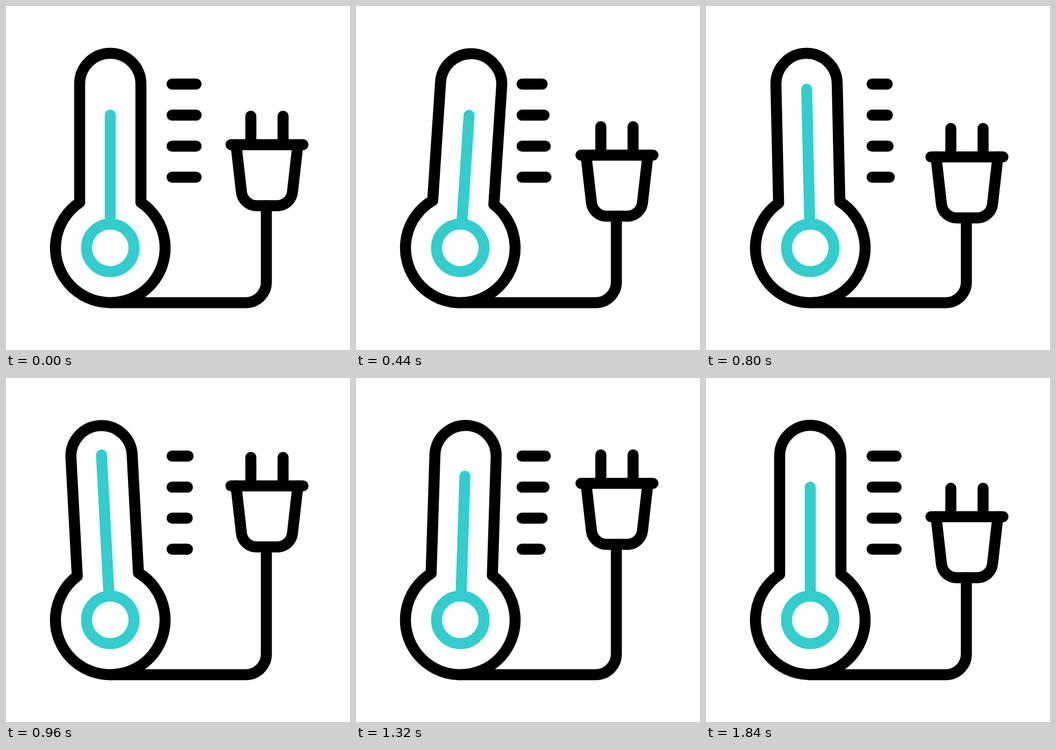
An HTML page for the animation above (2 s loop, 640 by 640 pixels).

```html
<!DOCTYPE html>
<html lang="en">
<head>
<meta charset="utf-8">
<title>Thermometer and plug</title>
<style>
  html, body { margin: 0; width: 100%; height: 100%; overflow: hidden; background: #fff; }
  svg { display: block; width: 100%; height: 100%; }
</style>
</head>
<body>
<svg viewBox="0 0 640 640" fill="none" stroke="#000" stroke-width="20.5" stroke-linecap="round" stroke-linejoin="round">
  <path id="cable"/>
  <g id="thermometer">
    <path d="M137 365.4V145A57 57 0 0 1 251 145V365.4A102 102 0 1 1 137 365.4Z"/>
    <g stroke="#33cdcd">
      <path id="mercury"/>
      <circle cx="194" cy="450" r="44.2"/>
    </g>
  </g>
  <g id="ticks"></g>
  <g id="plug">
    <path d="M455.5 205V258M515.5 205V258M418.5 258H552.5"/>
    <path d="M428 258L438 346A28.5 28.5 0 0 0 466 371.5H505A28.5 28.5 0 0 0 533 346L543 258"/>
  </g>
</svg>
<script>
const LOOP = 2000, STEP = 40;
const el = id => document.getElementById(id);
const cable = el('cable'), thermometer = el('thermometer'), mercury = el('mercury'), plug = el('plug');

const ticks = [145.2, 203, 260.8, 318.6].map(y => {
  const path = document.createElementNS('http://www.w3.org/2000/svg', 'path');
  el('ticks').append(path);
  return { path, y };
});

// Cubic bezier (.5, 0, .5, 1)
function ease(x) {
  let lo = 0, hi = 1;
  for (let i = 0; i < 24; i++) {
    const s = (lo + hi) / 2;
    if (1.5 * s * (1 - s) + s * s * s < x) lo = s; else hi = s;
  }
  return lo * lo * (3 - 2 * lo);
}

// Keys are [time, value] pairs
function track(keys, t) {
  if (t <= keys[0][0]) return keys[0][1];
  for (let i = 1; i < keys.length; i++) {
    const [t0, v0] = keys[i - 1], [t1, v1] = keys[i];
    if (t < t1) return v0 + (v1 - v0) * ease((t - t0) / (t1 - t0));
  }
  return keys[keys.length - 1][1];
}

const swing = [[80, 0], [520, 4], [960, -3.05], [1380, 2], [1840, 0]];
const rise = [[400, 0], [1000, 60.7], [1550, 0]];
const pull = [[80, 0], [720, 31.5], [1092, -84.5], [1700, 0]];
const shrink = [[120, 0], [800, 16.5], [1480, 0]];

function draw(t) {
  const drop = track(pull, t);
  thermometer.setAttribute('transform', `rotate(${track(swing, t)} 194 450)`);
  mercury.setAttribute('d', `M194 ${203 - track(rise, t)}V405`);
  plug.setAttribute('transform', `translate(0 ${drop})`);
  cable.setAttribute('d', `M194 552H446A38.4 38.4 0 0 0 484.4 513.6V${371.5 + drop}`);
  ticks.forEach(({ path, y }, i) =>
    path.setAttribute('d', `M309 ${y}H${353.7 - track(shrink, t - 80 * i)}`));
}

function frame() {
  const t = performance.now() % LOOP;
  draw(Math.floor(t / STEP) * STEP);
  requestAnimationFrame(frame);
}
frame();
</script>
</body>
</html>
```
